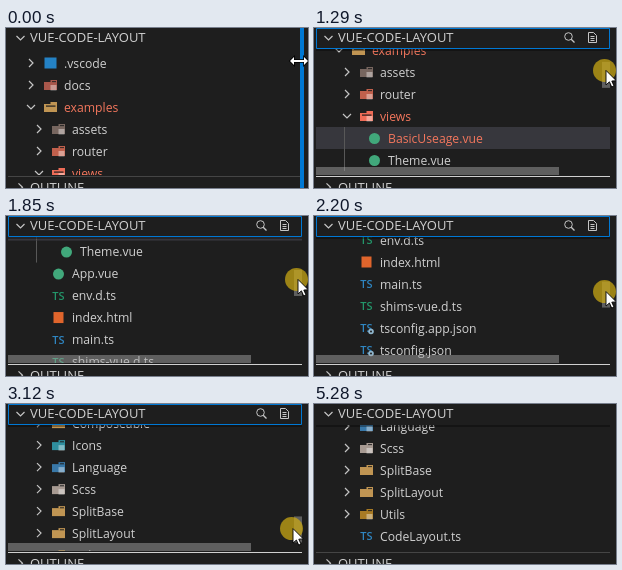
An HTML page with a canvas that plays this animation: 302 px wide and 160 px high, repeating every 5.55 s.

```html
<!DOCTYPE html>
<html lang="en">
<head>
<meta charset="utf-8">
<title>File tree scrolling</title>
<style>
html, body { margin: 0; width: 100%; height: 100%; overflow: hidden; background: #1e1e1e; }
canvas { display: block; width: 302px; height: 160px; }
</style>
</head>
<body>
<canvas id="stage"></canvas>
<script>
const W = 302, H = 160, LOOP = 5550, STEP = 70;
const LEFT = 2, RIGHT = 296, TOP = 21, BOTTOM = 147;
const ROW = 22, FIRST = 35, MAX = 475;
const BG = '#1e1e1e', TEXT = '#d0d0d0', ERROR = '#f4775d', BLUE = '#0078d4', TOOL = '#c5c5c5';
const SANS = '"Open Sans", "Noto Sans", sans-serif';

const canvas = document.getElementById('stage');
const ctx = canvas.getContext('2d');
const ratio = window.devicePixelRatio || 1;
canvas.width = Math.round(W * ratio);
canvas.height = Math.round(H * ratio);

// Leading spaces give the depth, + a closed folder, - an open one.
const tree = `+.vscode
+docs
-examples
 +assets
 +router
 -views
  BasicUseage.vue
  Theme.vue
 App.vue
 env.d.ts
 index.html
 main.ts
 shims-vue.d.ts
 tsconfig.app.json
 tsconfig.json
 tsconfig.node.json
 vite.config.ts
-library
 +Components
 +Composeable
 +Icons
 +Language
 +Scss
 +SplitBase
 +SplitLayout
 +Utils
 CodeLayout.ts`;

const rows = tree.split('\n').map(line => {
  const [, pad, fold, name] = line.match(/^( *)([+-]?)(.*)$/);
  return { depth: pad.length, fold, name };
});
const faulty = ['examples', 'views', 'BasicUseage.vue'];
const selected = 'BasicUseage.vue';

const plainFolder = '#c09553';
const folderColors = {
  docs: '#a8574b', assets: '#77665f', router: '#c0604c', views: '#ee6c57',
  library: '#b39a72', Components: '#d09a2c', Icons: '#2f8f9f',
  Language: '#3978a8', Scss: '#a79a92', Utils: '#a87a24'
};

// time and offset of the drag
const dragKeys = [[850, 0], [1290, 57], [1570, 109], [2200, 209], [2690, 343], [3300, MAX]];

const clamp = v => Math.max(0, Math.min(1, v));
const ramp = (t, from, to) => clamp((t - from) / (to - from));
const scrollAt = t => dragKeys.slice(1).reduce((sum, [time, pos], i) =>
  sum + (pos - dragKeys[i][1]) * ramp(t, dragKeys[i][0], time), 0);

function rect(x, y, w, h, color) {
  ctx.fillStyle = color;
  ctx.fillRect(x, y, w, h);
}

function disc(x, y, r, color) {
  ctx.fillStyle = color;
  ctx.beginPath();
  ctx.arc(x, y, r, 0, Math.PI * 2);
  ctx.fill();
}

function path(points, closed) {
  ctx.beginPath();
  points.forEach(([x, y]) => ctx.lineTo(x, y));
  if (closed) ctx.closePath();
}

function stroke(color, width = 1) {
  ctx.strokeStyle = color;
  ctx.lineWidth = width;
  ctx.stroke();
}

function label(str, x, base, color = TEXT, font = '12.2px', align = 'left') {
  ctx.font = font + ' ' + SANS;
  ctx.textAlign = align;
  ctx.fillStyle = color;
  ctx.fillText(str, x, base);
}

function chevron(x, y, down) {
  ctx.save();
  ctx.translate(x, y);
  if (down) ctx.rotate(Math.PI / 2);
  path([[-2, -4], [2, 0], [-2, 4]]);
  stroke(TOOL, 1.2);
  ctx.restore();
}

function folderIcon(x, y, { name, fold }) {
  const color = folderColors[name];
  rect(x - 6.5, y - 3, 13, 8, color || plainFolder);
  rect(x, y - 5, 6.5, 2, color || plainFolder);
  if (fold === '-') rect(x - 4.5, y - 1.5, 9.5, 1.2, BG);
  else rect(x + 1.5, y - 3.8, 4, 0.9, BG);
  if (color) rect(x, y, 6, 5.5, 'rgba(255,255,255,.4)');
}

function fileIcon(x, y, name) {
  if (name.endsWith('.vue')) return disc(x, y + 0.5, 5.5, '#41a87b');
  if (name.endsWith('.html')) return rect(x - 5, y - 5.5, 10, 11, '#e0652c');
  if (name.startsWith('vite')) return rect(x - 4.5, y - 5, 9, 10, '#f0b92d');
  label('TS', x, y + 4, name.endsWith('.d.ts') ? '#23966a' : '#2f86c2', '600 11px', 'center');
  if (name.endsWith('.json')) {
    disc(x + 4.5, y + 3.5, 2.8, '#8fb5cc');
    disc(x + 4.5, y + 3.5, 1, BG);
  }
}

function drawRow(row, y) {
  const { name, depth, fold } = row, indent = depth * 8;
  if (name === selected) rect(LEFT, y - 11, RIGHT - LEFT, ROW, '#37373d');
  if (depth === 2) rect(30, y - 11, 1, ROW, '#585858');
  if (fold) chevron(25 + indent, y, fold === '-');
  if (name === '.vscode') rect(38.5, y - 5.5, 12, 11, '#2482c5');
  else if (fold) folderIcon(44.5 + indent, y, row);
  else fileIcon(44.5 + indent, y, name);
  label(name, 58 + indent, y + 4.5, faulty.includes(name) ? ERROR : TEXT);
}

function drawTree(scroll, bars) {
  ctx.save();
  ctx.beginPath();
  ctx.rect(LEFT, TOP, RIGHT - LEFT, BOTTOM - TOP);
  ctx.clip();
  rows.forEach((row, i) => drawRow(row, FIRST + i * ROW - scroll));
  if (scroll) rect(LEFT, TOP, RIGHT - LEFT, 2, 'rgba(0,0,0,.35)');
  ctx.globalAlpha = bars;
  const thumb = 'rgba(165,165,165,.48)';
  rect(LEFT, 139, 243, 8, thumb);
  rect(288, TOP + 1 + scroll / MAX * 99, 8, 26, thumb);
  ctx.restore();
}

function drawTools() {
  ctx.beginPath();
  ctx.arc(254.5, 8.5, 3.8, 0, Math.PI * 2);
  stroke(TOOL);
  path([[257.2, 11.2], [260.5, 14.5]]);
  stroke(TOOL, 1.3);
  path([[274.5, 4.5], [279.5, 4.5], [282.5, 7.5], [282.5, 14.5], [274.5, 14.5]], true);
  stroke(TOOL);
  for (const y of [8, 10, 12]) rect(276.5, y, 4, 1, TOOL);
}

function drawHeader(title, y, down) {
  chevron(14.5, y, down);
  label(title, 24, y + 4.2, TEXT, '13px');
}

function arrow(x, y) {
  path([[0, 0], [0, 14.5], [3.4, 11.4], [5.7, 16.5], [8, 15.5], [5.8, 10.6], [10.3, 10.3]]
    .map(([dx, dy]) => [x + dx, y + dy]), true);
  ctx.fillStyle = '#fff';
  ctx.fill();
  stroke('#000', 0.9);
}

function resizeArrow(x, y) {
  for (const side of [-1, 1]) {
    path([[0, -1], [5, -1], [5, -4], [9, 0], [5, 4], [5, 1], [0, 1]]
      .map(([dx, dy]) => [x + side * dx, y + dy]));
    stroke('#000', 1.6);
    ctx.fillStyle = '#fff';
    ctx.fill();
  }
}

function drawPointer(t, scroll, resizing, pressed) {
  const x = 292 - 5 * ramp(t, 2200, 2690);
  const y = 30 + scroll * 0.218 + Math.max(0, t - 3740) * 0.14;
  if (pressed) disc(x - 1.5, y, 11.5, 'rgba(205,170,20,.72)');
  if (resizing) resizeArrow(293, 33);
  else arrow(x, y);
}

function draw(time) {
  const t = Math.floor((time - 30) / STEP) * STEP + 30;
  const scroll = scrollAt(t);
  const resizing = time < 210;
  const hover = !resizing && time < 5280;
  const focus = time >= 610 && hover;
  const pressed = time >= 790 && time < 3450;
  const bars = !hover || time >= 4400 ? 0 : time >= 4190 ? 0.5 : 1;

  ctx.setTransform(ratio, 0, 0, ratio, 0, 0);
  rect(0, 0, W, H, BG);
  drawTree(scroll, bars);
  drawHeader('VUE-CODE-LAYOUT', 10, true);
  if (hover) drawTools();
  if (focus) {
    ctx.beginPath();
    ctx.rect(LEFT + 0.5, 0.5, RIGHT - LEFT - 1, TOP - 1);
    stroke(BLUE);
  }
  rect(LEFT, 148, RIGHT - LEFT, 1, focus ? '#d0d0d0' : '#454545');
  drawHeader('OUTLINE', 159.3, false);
  if (resizing) rect(294, 0, 4, H, BLUE);
  if (time < 3990) drawPointer(t, scroll, resizing, pressed);
}

const begin = performance.now();
function tick() {
  draw((performance.now() - begin) % LOOP);
  requestAnimationFrame(tick);
}
tick();
</script>
</body>
</html>
```
